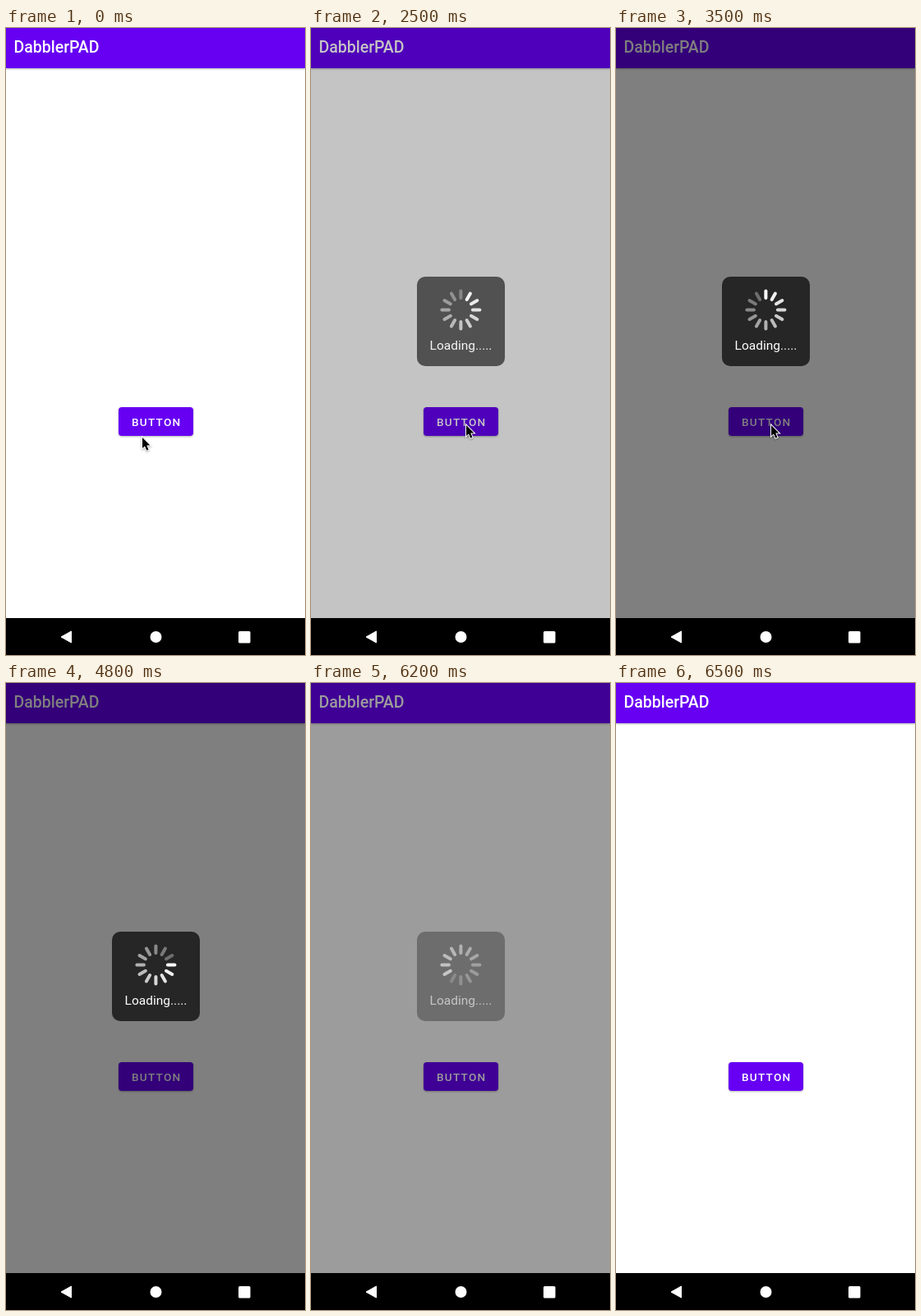
Animation of 364 by 764 pixels, one loop 6600 ms. Source, as an HTML page:

```html
<!DOCTYPE html>
<html lang="en">
<head>
<meta charset="utf-8">
<title>Loading overlay</title>
<style>
  html, body { margin: 0; width: 100%; height: 100%; overflow: hidden; background: #fff; }
  svg { position: absolute; left: 0; top: 0; font-family: Roboto, sans-serif; }
  .bar { filter: drop-shadow(0 1px 1.2px rgba(0, 0, 0, .3)); }
</style>
</head>
<body>
<svg width="364" height="764" viewBox="0 0 364 764">
  <defs><clipPath id="clip"><rect x="137" y="462" width="91" height="35" rx="4"/></clipPath></defs>
  <rect width="364" height="764" fill="#fff"/>
  <rect class="bar" width="364" height="49" fill="#6700f3"/>
  <text x="9.5" y="30" font-size="19.5" font-weight="500" fill="#fff">DabblerPAD</text>
  <rect class="bar" x="137" y="462" width="91" height="35" rx="4" fill="#6700f3"/>
  <g clip-path="url(#clip)"><circle id="ripple" cx="189" cy="484" fill="#fff"/></g>
  <text x="153" y="485.3" font-size="13.6" font-weight="500" letter-spacing="1.25" fill="#fff">BUTTON</text>
  <rect id="dim" width="364" height="719"/>
  <g id="hud">
    <rect x="129" y="303" width="107" height="109" rx="10" fill-opacity=".7"/>
    <g id="spinner" stroke="#fff" stroke-width="4" stroke-linecap="round"></g>
    <text x="182.5" y="392.3" font-size="15.5" text-anchor="middle" fill="#fff">Loading.....</text>
  </g>
  <rect y="719" width="364" height="45"/>
  <g fill="#fff">
    <path d="M67 742L79.5 735V749Z" stroke="#fff" stroke-linejoin="round"/>
    <circle cx="182.5" cy="742" r="7"/>
    <rect x="283" y="735" width="14.5" height="14.5" rx="1.5"/>
  </g>
  <path id="cursor" d="M0 0V13L3 10.4L5.3 15.7L7.5 14.7L5.3 9.6H9.4Z" stroke="#fff" stroke-width="2"
    paint-order="stroke" style="filter: drop-shadow(0 1px 1px rgba(0, 0, 0, .35))"/>
</svg>
<script>
const LOOP = 6600, FRAME = 100, SPOKES = 12, SPOKE_MS = 85.5;
const $ = id => document.getElementById(id);
const [ripple, dim, hud, spinner, cursor] = ['ripple', 'dim', 'hud', 'spinner', 'cursor'].map($);

const ramp = (t, from, to) => Math.min(1, Math.max(0, (t - from) / (to - from)));
const smooth = (t, from, to) => { const p = ramp(t, from, to); return p * p * (3 - 2 * p); };

// Cursor waypoints: time, x, y
const path = [
  [0, 166, 499], [200, 177, 562], [300, 177, 562], [1000, 189, 484],
  [3700, 189, 484], [3900, 192, 519], [4700, 204, 764]
];

for (let i = 0; i < SPOKES; i++) {
  const spoke = document.createElementNS('http://www.w3.org/2000/svg', 'path');
  spoke.setAttribute('d', 'M0 -14.5V-23');
  spoke.setAttribute('transform', `rotate(${i * 360 / SPOKES})`);
  spoke.setAttribute('opacity', 1 - i * 0.061);
  spinner.append(spoke);
}

function moveCursor(t) {
  const i = path.findIndex(p => p[0] > t);
  cursor.setAttribute('visibility', i < 0 ? 'hidden' : 'visible');
  if (i < 0) return;
  const [t0, x0, y0] = path[i - 1], [t1, x1, y1] = path[i];
  const p = ramp(t, t0, t1);
  cursor.setAttribute('transform', `translate(${x0 + (x1 - x0) * p} ${y0 + (y1 - y0) * p})`);
}

function draw(now) {
  const t = Math.floor(now % LOOP / FRAME) * FRAME;
  moveCursor(t);
  ripple.setAttribute('r', 70 * ramp(t, 1800, 2100));
  ripple.setAttribute('opacity', 0.24 * (1 - ramp(t, 2000, 2400)));
  dim.setAttribute('opacity', 0.5 * (smooth(t, 2310, 2710) - smooth(t, 6120, 6380)));
  hud.setAttribute('opacity', ramp(t, 2300, 2540) - ramp(t, 6120, 6260));
  const step = Math.floor(1.05 + (t - 2500) / SPOKE_MS);
  spinner.setAttribute('transform', `translate(182.4 343.5) rotate(${step * 360 / SPOKES})`);
  requestAnimationFrame(() => draw(performance.now()));
}
draw(0);
</script>
</body>
</html>
```
